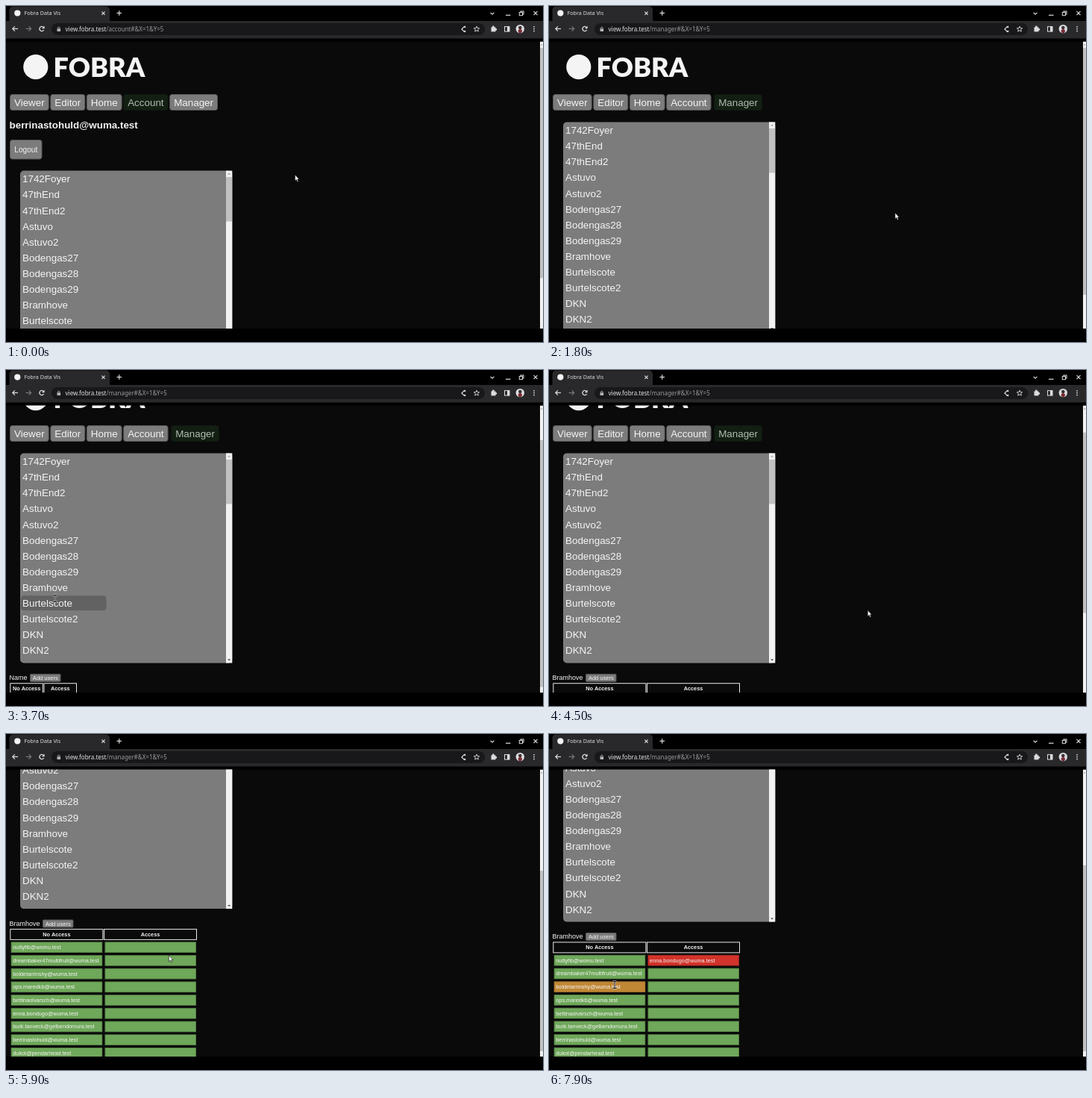
An HTML page with a canvas that plays this animation: 720 px wide and 450 px high, repeating every 8 s.

```html
<!DOCTYPE html>
<html lang="en">
<head>
<meta charset="utf-8">
<title>Data Vis</title>
<style>
html, body { margin: 0; width: 100%; height: 100%; overflow: hidden; background: #000; }
canvas { display: block; width: 720px; height: 450px; }
</style>
</head>
<body>
<canvas id="stage" width="720" height="450"></canvas>
<script>
const g = document.getElementById('stage').getContext('2d');
const LOOP = 8000, STEP = 100;
const SANS = '"Liberation Sans", Arial, sans-serif';
const UI = '"Noto Sans", "Open Sans", sans-serif';
const WHITE = '#f4f4f4', GRAY = '#7c7c7c', INK = '#dcdcde';
const GREEN = '#6fa85a', RED = '#d2332a', ORANGE = '#c08735';
const TOP = 47.5, VIEW = 384.5, ROW = 21.11, USER = 17.7;

const pages = ['Viewer', 'Editor', 'Home', 'Account', 'Manager'];
const places = ['1742Foyer', '47thEnd', '47thEnd2', 'Astuvo', 'Astuvo2', 'Bodengas27', 'Bodengas28',
  'Bodengas29', 'Bramhove', 'Burtelscote', 'Burtelscote2', 'DKN', 'DKN2', 'Dorvent'];
const owner = 'berrinastohuld@wuma.test';
const moved = 'enna.bondugo@wuma.test';
const users = ['nuttyfib@womu.test', 'dreambaker47multifruit@wuma.test', 'boldetarrinshy@wuma.test',
  'ops.maredkb@wuma.test', 'bettinaolvarsch@wuma.test', moved, 'burk.tanveck@gelbendomura.test',
  owner, 'dukot@pendarhead.test'];

// Each move: begin, end, target x, target y, upward bend
const HOME = { x: 387.5, y: 226 };
const moves = [
  [100, 200, 349, 199],
  [300, 1200, 248.5, 129],
  [1400, 1800, 464, 277],
  [2500, 3000, 145, 323, 212],
  [3300, 3700, 66, 306],
  [3700, 3900, 58, 291],
  [4300, 4600, 556.5, 332.5],
  [5700, 6000, 100, 284],
  [6000, 6400, 95, 424],
  [6400, 6700, 120.5, 375],
  [7400, 7500, 212, 287],
  [7500, 7600, 24, 374],
  [7700, 7900, 88, 336]
];
const clamp = v => Math.max(0, Math.min(1, v));
const smooth = u => u * u * (3 - 2 * u);
const settle = u => 1 - (1 - u) ** 3.9;

function mouseAt(t) {
  let { x, y } = HOME;
  for (const [from, to, tx, ty, bend = 0] of moves) {
    const u = smooth(clamp((t - from) / (to - from)));
    x += (tx - x) * u;
    y += (ty - y) * u - bend * Math.sin(Math.PI * u);
  }
  return { x, y };
}
function scrollAt(t, end) {
  const s = 44 * settle(clamp((t - 1900) / 200));
  return Math.min(end, s + (202.3 - 44) * settle(clamp((t - 4800) / 400)));
}

let mouse, beam, hoverOn;
const over = (x, y, w, h) => mouse.x >= x && mouse.x < x + w && mouse.y >= y && mouse.y < y + h;

function rect(x, y, w, h, color) {
  g.fillStyle = color;
  g.fillRect(x, y, w, h);
}
function frame(x, y, w, h, color, width = 1) {
  g.strokeStyle = color;
  g.lineWidth = width;
  g.strokeRect(x, y, w, h);
}
function round(x, y, w, h, r, fill, stroke) {
  g.beginPath();
  g.roundRect(x, y, w, h, r);
  g.fillStyle = fill;
  g.fill();
  if (!stroke) return;
  g.strokeStyle = stroke;
  g.lineWidth = 1;
  g.stroke();
}
function arc(x, y, r, from, to, width, color) {
  g.strokeStyle = color;
  g.lineWidth = width;
  g.beginPath();
  g.arc(x, y, r, from, to);
  g.stroke();
}
function disc(x, y, r, color) {
  g.fillStyle = color;
  g.beginPath();
  g.arc(x, y, r, 0, 7);
  g.fill();
}
function line(x1, y1, x2, y2, color = INK, width = 1.2) {
  g.strokeStyle = color;
  g.lineWidth = width;
  g.beginPath();
  g.moveTo(x1, y1);
  g.lineTo(x2, y2);
  g.stroke();
}
// V shape with its tip at x, y, opening towards the angle
function chevron(x, y, r, angle, color = INK, solid) {
  g.strokeStyle = g.fillStyle = color;
  g.lineWidth = 1.2;
  g.beginPath();
  for (const [d, a] of [[r, -0.8], [0, 0], [r, 0.8]])
    g.lineTo(x + d * Math.cos(angle + a), y + d * Math.sin(angle + a));
  solid ? g.fill() : g.stroke();
}
function cross(x, y, r) {
  line(x - r, y - r, x + r, y + r);
  line(x - r, y + r, x + r, y - r);
}
// y is the middle of the capitals
function text(s, x, y, size, color = WHITE, weight = '', family = SANS, align = 'left') {
  g.font = `${weight} ${size}px ${family}`;
  g.textAlign = align;
  g.fillStyle = color;
  g.fillText(s, x, y + size * 0.36);
  return g.measureText(s).width;
}

function tabStrip() {
  round(4.5, 0.5, 134.5, 24, [5, 5, 0, 0], '#29292b');
  disc(15.3, 9.6, 4.1, WHITE);
  text('Fobra Data Vis', 24.5, 9.8, 7.2, INK, '', UI);
  cross(130.5, 9.7, 2.1);
  line(148.5, 9.5, 155, 9.5);
  line(151.7, 6.2, 151.7, 12.8);
  chevron(652, 11.2, 3.4, -Math.PI / 2);
  line(670, 12.3, 676.5, 12.3);
  frame(690, 7, 4, 4, INK);
  rect(687.8, 8, 5.2, 5.2, '#000');
  frame(688.3, 8.5, 4.2, 4.2, INK);
  cross(710, 9.7, 2.5);
}

function toolbar(page) {
  line(9, 30.5, 16, 30.5);
  chevron(8.8, 30.5, 4.4, 0);
  line(26.5, 30.5, 33.5, 30.5, '#77777a');
  chevron(33.7, 30.5, 4.4, Math.PI, '#77777a');
  arc(48, 30.6, 3, 0.5, 5.5, 1.2, INK);
  chevron(51.6, 30.2, 3.6, -2.36, INK, true);

  round(61, 23, 581, 16, 8, '#18181a');
  rect(68.5, 30.2, 4.6, 3.8, '#b4b4b6');
  arc(70.8, 29.8, 1.5, Math.PI, 0, 0.9, '#b4b4b6');
  const w = text('view.fobra.test', 79.5, 31, 8, '#e4e4e6', '', UI);
  text('/' + page + '#&X=1&Y=5', 79.5 + w, 31, 8, '#98989b', '', UI);

  chevron(611, 31, 5, 0);
  for (const dy of [-3, 3]) disc(615.2, 31 + dy, 1.2, INK);
  g.lineWidth = 0.9;
  g.beginPath();
  for (let i = 0; i < 10; i++) {
    const r = i % 2 ? 1.7 : 3.9, a = i * Math.PI / 5 - Math.PI / 2;
    g.lineTo(631 + r * Math.cos(a), 31 + r * Math.sin(a));
  }
  g.closePath();
  g.stroke();
  rect(650.5, 28.4, 6, 6, INK);
  disc(653.3, 28, 1.4, INK);
  disc(656.8, 31.4, 1.4, INK);
  frame(668.5, 27.6, 6.5, 6.5, INK);
  rect(672, 27.6, 3, 6.5, INK);
  disc(689.3, 30.6, 5.7, '#dddde0');
  disc(689.3, 29, 2.3, '#3c3034');
  disc(689.3, 33.5, 2.6, '#7a2a30');
  for (let i = -1; i < 2; i++) disc(708, 30.7 + i * 2.9, 0.9, INK);
}

function button(label, x, y, w, h, size, on) {
  const hot = !on && h > 15 && over(x, y, w, h);
  round(x, y, w, h, h > 15 ? 3 : 1, on ? '#131f13' : hot ? '#5a9148' : GRAY,
    on ? '#101810' : hot ? '#3f7a33' : '#565656');
  text(label, x + w / 2, y + h / 2, size, on ? '#aebdae' : WHITE, '', SANS, 'center');
}

function nav(y, current) {
  let x = 5.5;
  for (const label of pages) {
    g.font = '13.4px ' + SANS;
    const w = g.measureText(label).width + 11;
    const on = label === current;
    button(label, on && label === 'Manager' ? x + 2 : x, y, w, 21, 13.4, on);
    x += w + 2.6;
  }
}

function list(y) {
  const h = 281, bottom = y + h;
  g.save();
  round(19, y, 284.3, h, 5, GRAY);
  g.clip();
  places.forEach((name, i) => {
    const ry = y + i * ROW;
    const hot = hoverOn && mouse.y > TOP && over(20, ry, 115, ROW);
    if (hot) round(20, ry + 0.8, 114.5, ROW - 1.4, 4, '#626262');
    const w = text(name, 22, ry + 10.9, 13.4);
    if (hot && over(22, ry, w, ROW)) beam = true;
  });
  g.restore();
  rect(295, y, 8.3, h, '#f1f1f1');
  rect(295, y + 8.5, 8, 59.5, '#c1c1c1');
  chevron(299.1, y + 3, 3, Math.PI / 2, '#a0a0a0', true);
  chevron(299.1, bottom - 3, 3, -Math.PI / 2, '#505050', true);
}

function cell(s, x, y, color, canHover) {
  const hot = canHover && hoverOn && over(x, y, 122.5, 14.6);
  rect(x, y, 122.5, 14.6, hot ? ORANGE : color);
  if (hot) g.setLineDash([1.5, 1]);
  frame(x + 0.4, y + 0.4, 121.7, 13.8, 'rgba(0,0,0,0.3)', 0.8);
  g.setLineDash([]);
  const w = text(s, x + 2.6, y + 7.2, 7.3);
  if (canHover && over(x + 2.6, y, w, 14.6)) beam = true;
}

function heading(s, x, y, w) {
  frame(x + 0.5, y + 0.5, w - 1, 14, '#e8e8e8');
  text(s, x + w / 2, y + 7.4, 7.3, WHITE, 'bold', SANS, 'center');
}

function table(s, picked, granted) {
  const y = 456 - s, cw = picked ? 125 : 44.5;
  const w = text(picked ? places[8] : 'Name', 4.5, y, 9);
  button('Add users', 8.5 + w, y - 4.7, 40.5, 10, 7.5);
  heading('No Access', 5.3, y + 7.2, cw);
  heading('Access', 6 + cw, y + 7.2, cw);
  if (!picked) return;
  users.filter(u => !granted || u !== moved).forEach((u, i) => {
    const ry = y + 24.7 + i * USER, given = granted && i === 0;
    cell(u, 6.7, ry, GREEN, true);
    cell(given ? moved : '', 132.5, ry, given ? RED : GREEN);
  });
}

function pageBar(s, height) {
  const k = 369 / height;
  rect(716, TOP, 4, VIEW, '#f1f1f1');
  rect(716, 56 + s * k, 4, VIEW * k, '#c1c1c1');
  chevron(718.1, 51, 2, Math.PI / 2, '#909090', true);
}

function pointer({ x, y }) {
  if (beam) {
    for (const [color, width] of [['#ddd', 2.2], ['#111', 1]]) {
      line(x, y - 4.5, x, y + 4.5, color, width);
      for (const d of [-4.5, 4.5]) line(x - 2.5, y + d, x + 2.5, y + d, color, width);
    }
    return;
  }
  const arrow = new Path2D('M0 0V8.2L1.9 6.5 3.2 9.4 4.6 8.8 3.3 6H5.6Z');
  g.save();
  g.translate(x, y);
  g.fillStyle = WHITE;
  g.strokeStyle = '#111';
  g.lineWidth = 0.6;
  g.fill(arrow);
  g.stroke(arrow);
  g.restore();
}

function draw(t) {
  const manager = t >= 1300, picked = t >= 4100, granted = t >= 7300;
  const height = !manager ? 460 : !picked ? 429 : 587 - granted * USER;
  const s = scrollAt(t, height - VIEW);
  mouse = mouseAt(t);
  beam = false;
  hoverOn = t < 7600 || t >= 7800;

  rect(0, 0, 720, 450, '#000');
  g.save();
  g.beginPath();
  g.rect(0, TOP, 720, VIEW);
  g.clip();
  rect(0, TOP, 720, VIEW, '#0a0a0a');
  disc(39.8, 81.6 - s, 16.6, WHITE);
  text('FOBRA', 63.5, 81.8 - s, 36, WHITE, '900', 'Lato, sans-serif');
  nav(118.5 - s, manager ? 'Manager' : 'Account');
  if (manager) {
    list(155.4 - s);
    table(s, picked, granted);
  } else {
    text(owner, 4.5, 159.6, 13.4, WHITE, 'bold');
    button('Logout', 5.5, 179.5, 42.5, 25.5, 10.1);
    list(220.6);
  }
  pageBar(s, height);
  g.restore();

  rect(0, 20, 720, 23.5, '#29292b');
  tabStrip();
  toolbar(t >= 1200 ? 'manager' : 'account');
  pointer(mouse);
}

let start;
function tick(now) {
  if (start === undefined) start = now;
  draw(Math.floor((now - start) % LOOP / STEP) * STEP);
  requestAnimationFrame(tick);
}
draw(0);
requestAnimationFrame(tick);
</script>
</body>
</html>
```
